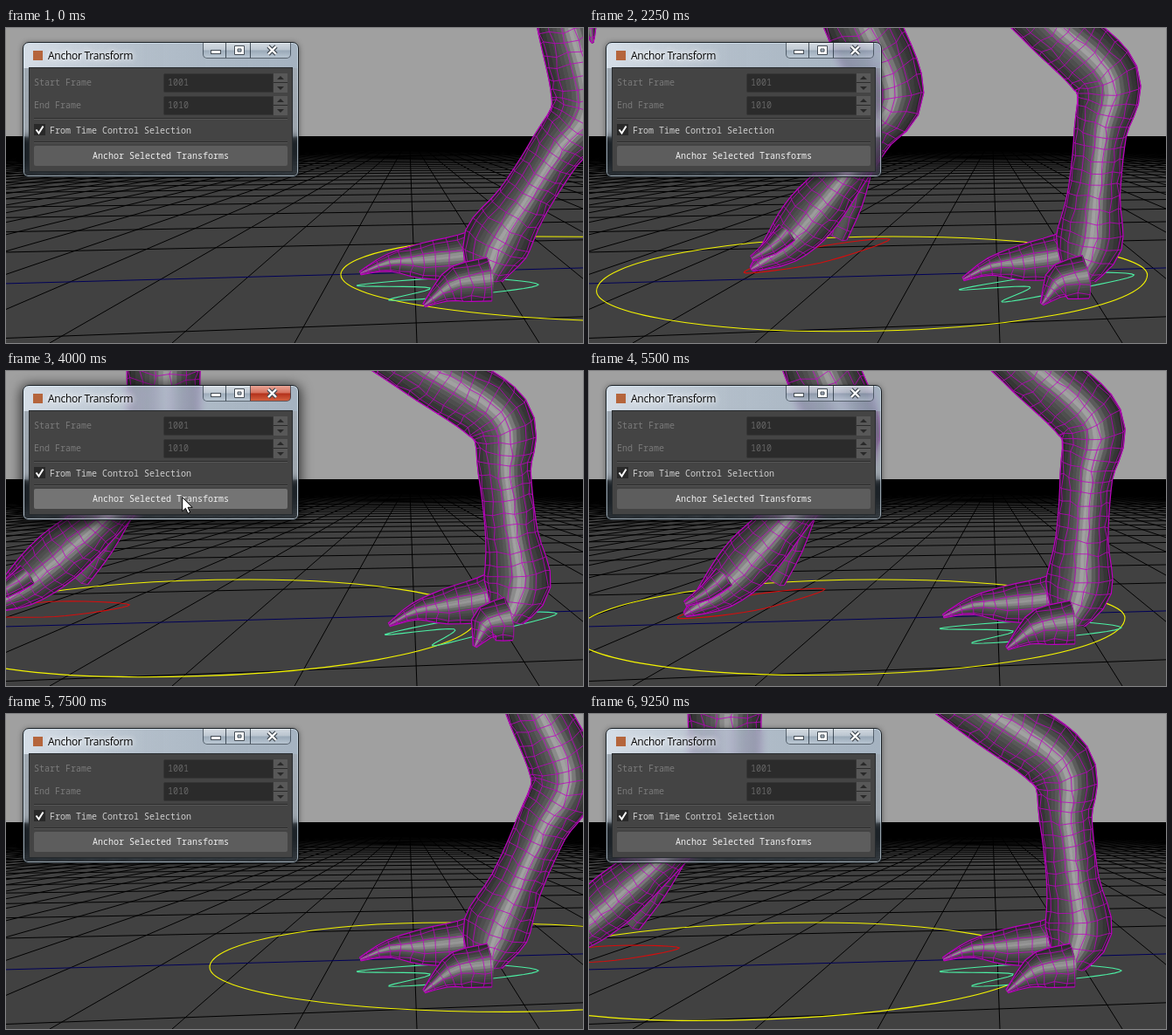
Recreate the animation shown at these times as an HTML page with a canvas. Size 660x361 px, loop 10 s.

```html
<!DOCTYPE html>
<html lang="en">
<head>
<meta charset="utf-8">
<title>Anchor Transform</title>
<style>
html, body { margin: 0; width: 100%; height: 100%; overflow: hidden; background: #414141; }
#stage { position: relative; width: 660px; height: 361px; overflow: hidden; }
#stage * { box-sizing: border-box; position: absolute; }
#win { left: 19px; top: 16px; width: 316px; height: 155px; border: 1px solid #1c2227; border-radius: 7px 7px 6px 6px;
  box-shadow: inset 0 0 0 1px rgba(215,230,242,.65), 0 1px 6px rgba(0,0,0,.45); backdrop-filter: blur(4px);
  background: linear-gradient(90deg, rgba(226,234,243,.8), rgba(196,210,224,.5) 45%, rgba(170,190,210,.45)) 0 0/100% 29px no-repeat,
    linear-gradient(rgba(160,180,200,.45) 29px, rgba(150,170,190,.4) 107px, rgba(70,85,98,.4) 109px); }
#win.active { box-shadow: inset 0 0 0 1px rgba(225,238,248,.75), 0 2px 14px 2px rgba(0,0,0,.7); }
#icon { left: 11px; top: 9px; width: 11px; height: 11px; background: #b5653c; }
#title { left: 28px; top: 5px; font: 12px/19px "Open Sans", "Noto Sans", sans-serif; color: #000; white-space: nowrap;
  text-shadow: 0 0 6px #fff, 0 0 6px #fff; letter-spacing: -.25px; }
.cap { top: 0; height: 18px; border: 1px solid rgba(50,62,74,.75); border-top: 0;
  background: linear-gradient(rgba(255,255,255,.5), rgba(255,255,255,.22) 48%, rgba(120,140,158,.28) 52%, rgba(215,228,238,.35)); }
.cap svg { left: 0; top: 0; width: 100%; height: 100%; }
#min { left: 205px; width: 27px; border-radius: 0 0 0 5px; }
#max { left: 231px; width: 29px; }
#close { left: 259px; width: 47px; border-radius: 0 0 5px 0; }
.active #close { background: linear-gradient(#e9a597, #d4705c 48%, #b3301a 52%, #d3603f); }
#panel { left: 6px; top: 28px; width: 302px; height: 120px; background: #444; border: 1px solid #262a2d;
  font: 10px/14px "Noto Sans Mono", "DejaVu Sans Mono", monospace; white-space: pre; }
#panel > * { margin: -1px; }
.dim { left: 6px; color: #7a7a7a; }
.field { left: 154px; width: 126px; height: 22px; background: #2b2b2b; border: 1px solid #363636; border-radius: 2px 0 0 2px;
  color: #666; padding: 2px 4px; }
.spin { left: 280px; width: 16px; height: 22px; background: linear-gradient(#585858 10px, #2b2b2b 10px, #2b2b2b 11px, #585858 11px); }
.spin::before, .spin::after { content: ""; position: absolute; left: 4px; border: 4px solid transparent; }
.spin::before { top: -1px; border-bottom-color: #292929; }
.spin::after { bottom: -1px; border-top-color: #292929; }
.rule { left: 6px; width: 290px; height: 2px; background: #2c2c2c; border-bottom: 1px solid #565656; }
#check { left: 6px; top: 65px; width: 13px; height: 13px; background: #292929; }
#check svg { left: 0; top: 0; }
#opt { left: 24px; top: 65px; color: #cfcfcf; }
#go { left: 6px; top: 90px; width: 290px; height: 23px; background: #5d5d5d; border-radius: 2px; color: #f0f0f0;
  text-align: center; line-height: 23px; }
.hover #go { background: #747474; }
#cursor { width: 14px; height: 22px; display: none; }
</style>
</head>
<body>
<div id="stage">
  <canvas id="view" width="660" height="361"></canvas>
  <div id="win">
    <div id="icon"></div><div id="title">Anchor Transform</div>
    <div class="cap" id="min"><svg><rect x="8.5" y="8.5" width="11" height="4" fill="#fff" stroke="#444c55"/></svg></div>
    <div class="cap" id="max"><svg><path d="M9.5 3.5h11v10h-11zM13 7h4v3h-4z" fill="#fff" stroke="#444c55" fill-rule="evenodd"/></svg></div>
    <div class="cap" id="close"><svg><path d="M20 4l9 9m0-9l-9 9" stroke="#444c55" stroke-width="4.6"/><path d="M20 4l9 9m0-9l-9 9" stroke="#fff" stroke-width="2.4"/></svg></div>
    <div id="panel">
      <span class="dim" style="top:10px">Start Frame</span><span class="field" style="top:7px">1001</span><i class="spin" style="top:7px"></i>
      <span class="dim" style="top:36px">End Frame</span><span class="field" style="top:33px">1010</span><i class="spin" style="top:33px"></i>
      <i class="rule" style="top:58px"></i>
      <i id="check"><svg width="13" height="13"><path d="M2.5 6.5l3 4 5-8" fill="none" stroke="#fff" stroke-width="2"/></svg></i>
      <span id="opt">From Time Control Selection</span>
      <i class="rule" style="top:85px"></i>
      <div id="go">Anchor Selected Transforms</div>
    </div>
  </div>
  <svg id="cursor"><path d="M.7 .8v16l3.7-3.5 2.6 6 2.7-1.2-2.6-5.8h5z" fill="#fff" stroke="#000"/></svg>
</div>
<script>
const W = 660, H = 361, TICK = 250, TICKS = 40, HORIZON = 124;
const MESH = '#be00c2';
const ctx = document.getElementById('view').getContext('2d');
const win = document.getElementById('win');
const cursor = document.getElementById('cursor');

const lerp = (a, b, t) => a + (b - a) * t;
const mix = (a, b, t) => a.map((v, i) => lerp(v, b[i], t));
const add = (a, dx, dy) => [a[0] + dx, a[1] + dy, ...a.slice(2)];
const quad = (start, speed, accel, t) => start - speed * t - accel * t * t;
const noise = n => { const s = Math.sin(n * 127.1) * 43758.5453; return s - Math.floor(s) - .5; };

// Walk position over time: play, hold, scrub back, play again.
function walk(tick) {
  if (tick < 3) return 1;
  if (tick < 9) return lerp(1, 8.6, (tick - 3) / 6);
  if (tick < 20) return Math.min(11, 8.6 + 1.2 * (tick - 9));
  if (tick <= 26) return tick < 22 ? 31 - tick : 9 - 2.25 * (tick - 22);
  return Math.min(11, tick - 26);
}
// How far the planted foot has slid before it is anchored.
const slide = tick => tick < 3 || tick > 16 ? 0 : Math.min(1, ((tick - 3) / 8) ** 2.6);

function spline(points, k, t, closed) {
  const n = points.length;
  const at = i => points[closed ? (i + n) % n : Math.max(0, Math.min(n - 1, i))];
  const a = at(k - 1), b = at(k), c = at(k + 1), d = at(k + 2);
  return b.map((v, i) => v + .5 * t * (c[i] - a[i] + t * (2 * a[i] - 5 * v + 4 * c[i] - d[i] + t * (3 * (v - c[i]) + d[i] - a[i]))));
}
function line(points, color, width = 1) {
  ctx.beginPath();
  points.forEach(([x, y]) => ctx.lineTo(x, y));
  ctx.strokeStyle = color;
  ctx.lineWidth = width;
  ctx.stroke();
}
function loop(points, color) {
  const out = [];
  for (let i = 0; i <= points.length * 8; i++) out.push(spline(points, Math.floor(i / 8), i % 8 / 8, true));
  line(out, color, 1.1);
}

function scenery() {
  ctx.fillStyle = '#a0a0a0';
  ctx.fillRect(0, 0, W, HORIZON);
  ctx.fillStyle = '#414141';
  ctx.fillRect(0, HORIZON, W, H);
  const across = (k, color) => {
    const d = 1 / (.00592 + .0016 * k);
    line([[0, HORIZON + d], [W, HORIZON + d * (1 - W / 6200)]], color);
  };
  for (let k = -2; k < 60; k++) if (k) across(k, '#000');
  for (let k = -60; k <= 40; k++) line([[462 + k * 8, HORIZON + 14], [470 + k * 140, H]], '#000');
  ctx.fillStyle = '#000';
  ctx.fillRect(0, HORIZON, W, 17);
  across(0, '#000058');
}

// Ground circle seen in perspective, drawn as four quarter arcs.
function groundCircle(c) {
  const left = c - 315, right = c + 315, skew = (403 - c) * .3, low = c - skew - 18;
  const pts = [[left, 302 - .05 * left], [c + skew, 239], [right, 283], [low, 354 - .022 * low]];
  ctx.beginPath();
  ctx.moveTo(...pts[0]);
  pts.forEach((a, i) => {
    const b = pts[(i + 1) % 4], corner = i % 2 ? [b[0], a[1]] : [a[0], b[1]];
    ctx.bezierCurveTo(...mix(a, corner, .552), ...mix(b, corner, .552), ...b);
  });
  ctx.strokeStyle = '#f4f400';
  ctx.lineWidth = 1.1;
  ctx.stroke();
}

// Shaded, meshed skin around joints [x, y, radius].
function limb(joints, cols, shine) {
  const rows = [];
  for (let k = 0; k < joints.length - 1; k++) {
    const [a, b] = [joints[k], joints[k + 1]];
    const steps = Math.max(2, Math.round(Math.hypot(b[0] - a[0], b[1] - a[1]) / 13));
    for (let i = 0; i < steps; i++) rows.push(spline(joints, k, i / steps));
  }
  rows.push(joints[joints.length - 1]);
  const last = rows.length - 1;
  const frames = rows.map(([x, y, r], i) => {
    const a = rows[Math.max(0, i - 1)], b = rows[Math.min(last, i + 1)];
    const dx = b[0] - a[0], dy = b[1] - a[1], len = Math.hypot(dx, dy) || 1;
    return [x, y, r, dx / len, dy / len];
  });
  const point = (i, v) => {
    const [x, y, r, tx, ty] = frames[i];
    const side = r * (1 - 2 * v), bow = r * .16 * Math.sin(Math.PI * v);
    return [x - ty * side + tx * bow, y + tx * side + ty * bow];
  };
  const bands = 16;
  for (let i = 0; i < last; i++) for (let j = 0; j < bands; j++) {
    const v = (j + .5) / bands;
    const g = Math.round(38 + 50 * Math.sin(Math.PI * v) + shine * Math.exp(-(((v - .55) / .13) ** 2)));
    ctx.beginPath();
    [[0, 0], [0, 1], [1, 1], [1, 0]].forEach(([di, dj]) => ctx.lineTo(...point(i + di, (j + dj) / bands)));
    ctx.closePath();
    ctx.fillStyle = ctx.strokeStyle = `rgb(${g},${g},${g})`;
    ctx.lineWidth = .7;
    ctx.fill();
    ctx.stroke();
  }
  const knots = frames.map((f, i) => Array.from({ length: cols + 1 }, (_, j) => {
    const wobble = j % cols ? .25 * f[2] / cols : 0;
    const p = point(i, (1 - Math.cos(Math.PI * j / cols)) / 2);
    return add(p, wobble * 4 * noise(i * 17 + j), wobble * 4 * noise(i * 31 + j + 5));
  }));
  for (let j = 0; j <= cols; j++) line(knots.map(row => row[j]), MESH, j % cols ? .8 : 1.2);
  knots.forEach(row => line(row, MESH, .8));
}

// Thigh runs off the top of the view; the hip lies on its upper edge.
const thighTop = (hip, knee) => [hip[0] + (hip[0] - knee[0]) * .6, hip[1] + (hip[1] - knee[1]) * .6, hip[2]];

function plantedLeg(u, w, early) {
  const t = u - 1, dx = 25 * w + 8 * early, dy = -4 * w;
  const hip = [quad(643, 8.3, 1.06, t) + dx, -2, 35];
  const hock = [quad(662, 6, .64, t) + dx, 58 + 30 * (1 - t / 10) ** 2 + dy, 38];
  const ankle = [560 + dx, 248 + dy, 38];
  const shin = f => [...mix(hock, ankle, f).slice(0, 2), 30];
  limb([thighTop(hip, hock), hip, hock, shin(.33), shin(.7), ankle, [548 + dx, 286 + dy, 20]], 7, 75);
}

function swingLeg(u, w, foot) {
  const t = u - 7, dx = 25 * w;
  const hip = [quad(488, 138.8, -13.9, t) + dx, -2, 42];
  const knee = [quad(516, 131, -10, t) + dx, 74, 39];
  const ankle = [quad(477, 147, -12.2, t) + 33 * foot, 162, 25];
  const tip = [quad(408, 179.5, -15.2, t) + 38 * foot, 279 - 4 * foot, 3];
  const along = (f, r, x = 0, y = 0) => [...add(mix(ankle, tip, f).slice(0, 2), x, y), r];

  const heelY = 268 - 72 * (1 - t / 4) ** 2;
  const left = add(tip, -9, 4), right = [tip[0] + 150 + 5 * t, Math.max(190, heelY)];
  const mid = mix(left.slice(0, 2), right, .5);
  loop([left.slice(0, 2), add(mid, -4, -9), right, add(mid, 4, 8)], '#d80c0c');

  limb([add(ankle.slice(0, 2), 14, 0).concat(14), along(.3, 14, 36, 4), along(.6, 12, 54, 8)], 3, 0);
  limb([thighTop(hip, knee), hip, knee, [...mix(knee, ankle, .5).slice(0, 2), 30], ankle,
    along(.45, 31, 8, 0), along(.75, 23, 8, 2), tip], 7, 70);
  limb([add(tip, 0, -12), along(.82, 9, 2, -4), along(.65, 13, 2, -2)], 4, 60);
}

// Toes run from claw tip to heel; the tip slides furthest.
function toe(joints, slip, early) {
  limb(joints.map((j, i) => {
    const f = 1 - i / (joints.length - 1);
    return add(j, lerp(22, slip[0], f) * early.foot + 8 * early.shift, lerp(-4, slip[1], f) * early.foot - 6 * early.shift);
  }), 5, 65);
}

function footprint(foot, early) {
  const keys = [[401, 295], [520, 286], [609, 294], [530, 306], [438, 312], [485, 298]];
  loop(keys.map(([x, y]) => {
    const f = (x - 401) / 208;
    return [x + foot * (lerp(32, 21, f) + (y > 310 ? 20 : 0)) + 10 * early, y + foot * lerp(7, -16, f) - 4 * early];
  }), '#4cf0a4');
}

function foreClaws(x, y) {
  for (const side of [-1, 1])
    limb([[x + side * 4, y - 26, 9], [x + side * 8, y - 8, 7], [x + side * 11, y + 8, 1]], 3, 40);
}

function drawScene(tick) {
  const u = walk(tick), w = slide(tick), foot = Math.sqrt(w);
  const early = Math.max(0, 1 - u), drift = { foot, shift: early };
  const centre = 698 - 50 * (u - 1);

  scenery();
  groundCircle(centre + 25 * w * w);
  footprint(foot, early);
  foreClaws(centre - 325, 9 - Math.max(0, 7 - u) * 14);
  swingLeg(u, w, foot);
  toe([[405, 281, 2], [438, 269, 10], [475, 267, 20], [520, 263, 26], [560, 256, 32]], [33, 10], drift);
  plantedLeg(u, w, early);
  toe([[478, 318, 2], [498, 303, 12], [517, 293, 21], [553, 288, 25]], [58, -2], drift);
}

function drawPointer(tick) {
  const over = tick >= 13 && tick < 18, entering = tick === 13;
  win.className = (over ? 'hover ' : '') + (over && tick >= 16 ? 'active' : '');
  cursor.style.display = over ? 'block' : 'none';
  cursor.style.left = (entering ? 314 : 201) + 'px';
  cursor.style.top = (entering ? 154 : 144) + 'px';
}

let shown = -1;
function play(now) {
  const tick = Math.floor(now / TICK) % TICKS;
  if (tick !== shown) {
    shown = tick;
    drawScene(tick);
    drawPointer(tick);
  }
  requestAnimationFrame(play);
}
play(performance.now());
</script>
</body>
</html>
```
